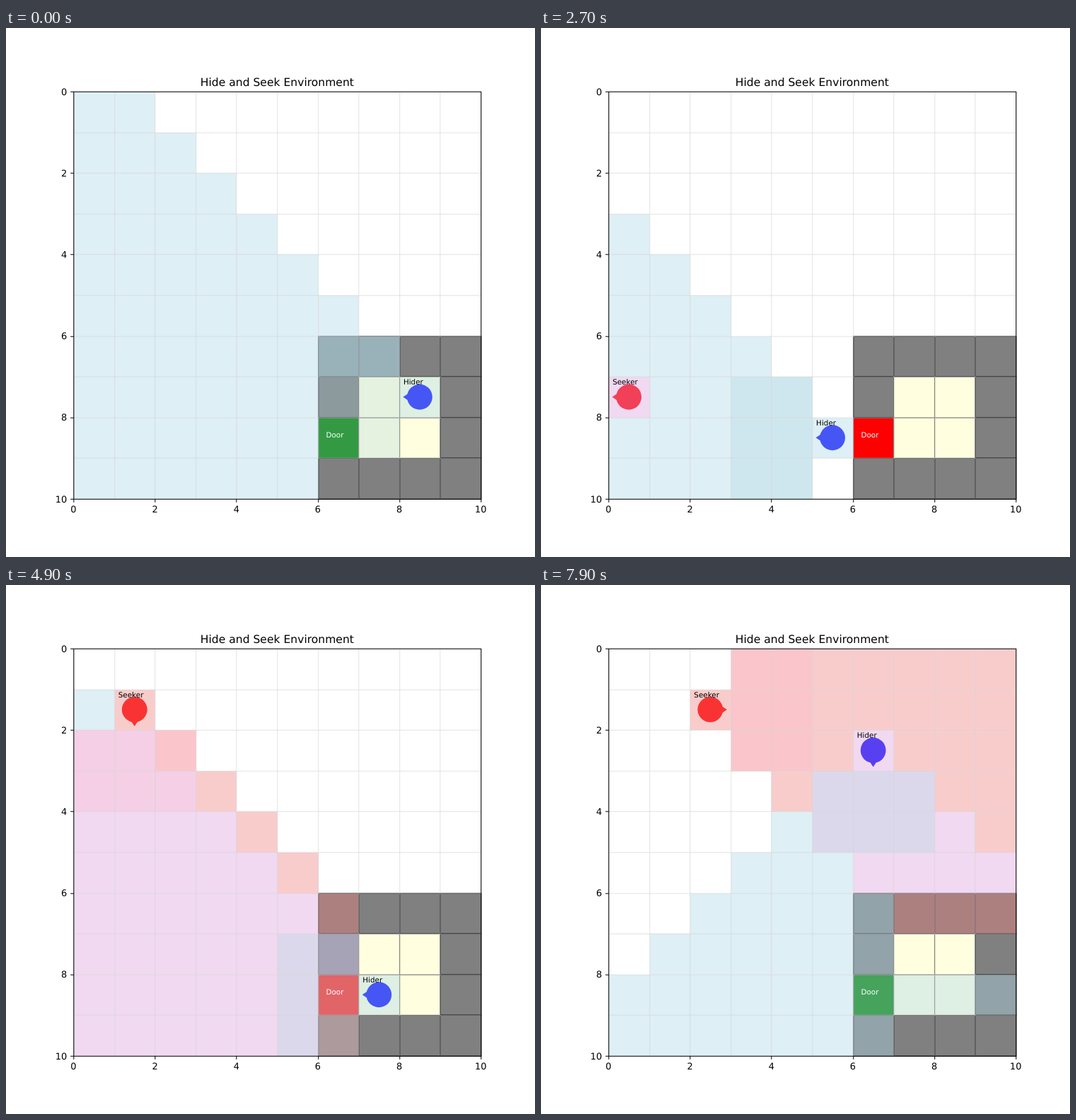
An HTML page that plays this animation: 748 px wide and 748 px high, repeating every 8000 ms.

```html
<!DOCTYPE html>
<html lang="en">
<head>
<meta charset="utf-8">
<title>Hide and Seek Environment</title>
<style>
  html, body { margin: 0; width: 100%; height: 100%; overflow: hidden; background: #fff; }
  svg { display: block; width: 748px; height: 748px; }
  text { font-family: "DejaVu Sans", sans-serif; text-rendering: geometricPrecision; }
  .label { font-size: 11.11px; }
  .tick { font-size: 13.89px; }
  .title { font-size: 16.67px; }
</style>
</head>
<body>
<svg viewBox="0 0 800 800">
  <g id="room"></g>
  <g id="agents"></g>
  <g id="sight"></g>
  <g id="axes"></g>
  <g id="labels"></g>
</svg>
<script>
const SIZE = 10, CELL = 61.6, LEFT = 102, TOP = 96;
const STEP_MS = 100, STEPS = 80;
const DOOR = { x: 6, y: 8 };
const DIRS = { u: [0, -1], d: [0, 1], l: [-1, 0], r: [1, 0] };
const TURN = { r: 0, d: 90, l: 180, u: 270 };

// One letter per step: capitals walk one cell, small letters only turn.
const HIDER = {
  name: "Hider", color: "blue", sight: "lightblue", near: "#a9d5df",
  x: 8, y: 7, dir: "l", from: 0,
  path: "LuRDlLuLLLuDRUlr" + "UUlLdDrRDul" + "LdLuURuRDrLu" +
        "RuRRuRdlLl" + "uURdDulLrud" + "LLuUruUUrUUrdRUlurd"
};
const SEEKER = {
  name: "Seeker", color: "red", sight: "lightcoral", near: "#fab6c6",
  x: 4, y: 6, dir: "l", from: 7,
  path: "LdDlLuLru" + "UrRdDuLuLdl" + "UUrURdUlrRLu" +
        "UlUrRuLurd" + "RdDrRuURLru" + "lruLuUrlRulrDuRLuLr"
};
const DOOR_TOGGLES = [16, 37, 49, 61];

const layer = id => document.getElementById(id);
const px = i => Math.round(LEFT + CELL * i) + 0.5;
const py = i => Math.round(TOP + CELL * i) + 0.5;
const inside = (x, y) => x >= 0 && y >= 0 && x < SIZE && y < SIZE;
const isDoor = (x, y) => x === DOOR.x && y === DOOR.y;
const isWall = (x, y) => x >= 6 && y >= 6 && !isDoor(x, y) &&
  (x === 6 || x === 9 || y === 6 || y === 9);

function cell(x, y, fill, attrs = "") {
  return `<rect x="${px(x)}" y="${py(y)}" width="${px(x + 1) - px(x)}" ` +
    `height="${py(y + 1) - py(y)}" fill="${fill}" ${attrs}/>`;
}

function label(x, y, text, attrs) {
  return `<text x="${x}" y="${y}" ${attrs}>${text}</text>`;
}

const doorOpen = step => DOOR_TOGGLES.filter(t => t <= step).length % 2 === 0;

function agentAt(agent, step) {
  if (step < agent.from) return null;
  let { x, y, dir } = agent;
  for (const move of agent.path.slice(0, step - agent.from)) {
    dir = move.toLowerCase();
    if (move === dir) continue;
    const nx = x + DIRS[dir][0], ny = y + DIRS[dir][1];
    if (inside(nx, ny) && !isWall(nx, ny)) [x, y] = [nx, ny];
  }
  return { ...agent, x, y, dir };
}

// Cell at a distance ahead and an offset across the line of sight.
function ahead({ x, y, dir }, dist, side) {
  const [dx, dy] = DIRS[dir];
  return [x + dx * dist + Math.abs(dy) * side, y + dy * dist + Math.abs(dx) * side];
}

// Each row of the widening cone is scanned until something solid stops it.
function sightOf(agent, open) {
  const seen = new Set();
  if (!agent) return seen;
  for (let dist = 0; dist < SIZE; dist++) {
    for (let side = -dist; side <= dist; side++) {
      const [x, y] = ahead(agent, dist, side);
      if (!inside(x, y)) continue;
      seen.add(y * SIZE + x);
      if (isWall(x, y) || (isDoor(x, y) && !open)) break;
    }
  }
  return seen;
}

function nearCells(agent) {
  let out = "";
  for (let dist = 1; dist <= 2; dist++) {
    for (let side = -1; side <= 1; side++) {
      const [x, y] = ahead(agent, dist, side);
      if (inside(x, y)) out += cell(x, y, agent.near, 'fill-opacity=".3"');
    }
  }
  return out;
}

function drawAgent({ x, y, dir, color }) {
  const cx = LEFT + (x + 0.5) * CELL, cy = TOP + (y + 0.5) * CELL;
  return `<g transform="translate(${cx} ${cy}) rotate(${TURN[dir]})" fill="${color}">` +
    `<circle r="19.15"/><path d="M18 -4.8L25.2 0L18 4.8Z"/></g>`;
}

function drawRoom(open) {
  let floor = "", walls = "";
  for (let y = 6; y < SIZE; y++) {
    for (let x = 6; x < SIZE; x++) {
      if (isWall(x, y)) walls += cell(x, y, "gray", 'stroke="#000" stroke-width="1.39"');
      else {
        const fill = isDoor(x, y) ? (open ? "green" : "red") : "lightyellow";
        floor += cell(x, y, fill, 'stroke="#000" stroke-width=".69"');
      }
    }
  }
  return walls + floor;
}

function drawSight(hider, seeker, open) {
  const blue = sightOf(hider, open), red = sightOf(seeker, open);
  let out = "";
  for (const key of new Set([...blue, ...red])) {
    const fill = !red.has(key) ? HIDER.sight : blue.has(key) ? "plum" : SEEKER.sight;
    out += cell(key % SIZE, Math.floor(key / SIZE), fill, 'fill-opacity=".4"');
  }
  return out;
}

function drawAxes() {
  const x0 = px(0), x1 = px(SIZE), y0 = py(0), y1 = py(SIZE);
  let grid = "", ticks = "", texts = "";
  for (let i = 0; i <= SIZE; i++) {
    grid += `M${px(i)} ${y0}V${y1}M${x0} ${py(i)}H${x1}`;
    if (i % 2) continue;
    ticks += `M${px(i)} ${y1}v5M${x0} ${py(i)}h-5`;
    texts += label(LEFT + CELL * i, 732.7, i, 'class="tick" text-anchor="middle"') +
      label(92.3, TOP + CELL * i + 5.3, i, 'class="tick" text-anchor="end"');
  }
  return `<path d="${grid}" stroke="lightgray" stroke-opacity=".7"/>` +
    `<path d="${ticks}M${x0} ${y0}H${x1}V${y1}H${x0}Z" fill="none" stroke="#000" stroke-width="1.11"/>` +
    texts + label(410, 87.7, "Hide and Seek Environment", 'class="title" text-anchor="middle"');
}

function drawLabels(agents) {
  const at = (x, y, dx, dy, text, fill) =>
    label(LEFT + (x + dx) * CELL, TOP + (y + dy) * CELL, text, `class="label" fill="${fill}"`);
  return at(DOOR.x, DOOR.y, 0.2, 0.5, "Door", "#fff") +
    agents.map(a => at(a.x, a.y, 0.1, 0.2, a.name, "#000")).join("");
}

function render(step) {
  const open = doorOpen(step);
  const hider = agentAt(HIDER, step), seeker = agentAt(SEEKER, step);
  const agents = [seeker, hider].filter(Boolean);
  layer("room").innerHTML = drawRoom(open);
  layer("agents").innerHTML = agents.map(drawAgent).join("");
  layer("sight").innerHTML = drawSight(hider, seeker, open) + agents.map(nearCells).join("");
  layer("labels").innerHTML = drawLabels(agents);
}

layer("axes").innerHTML = drawAxes();
render(0);

let start = null, shown = 0;
function tick(now) {
  if (start === null) start = now;
  const step = Math.floor((now - start) / STEP_MS) % STEPS;
  if (step !== shown) render(shown = step);
  requestAnimationFrame(tick);
}
requestAnimationFrame(tick);
</script>
</body>
</html>
```
